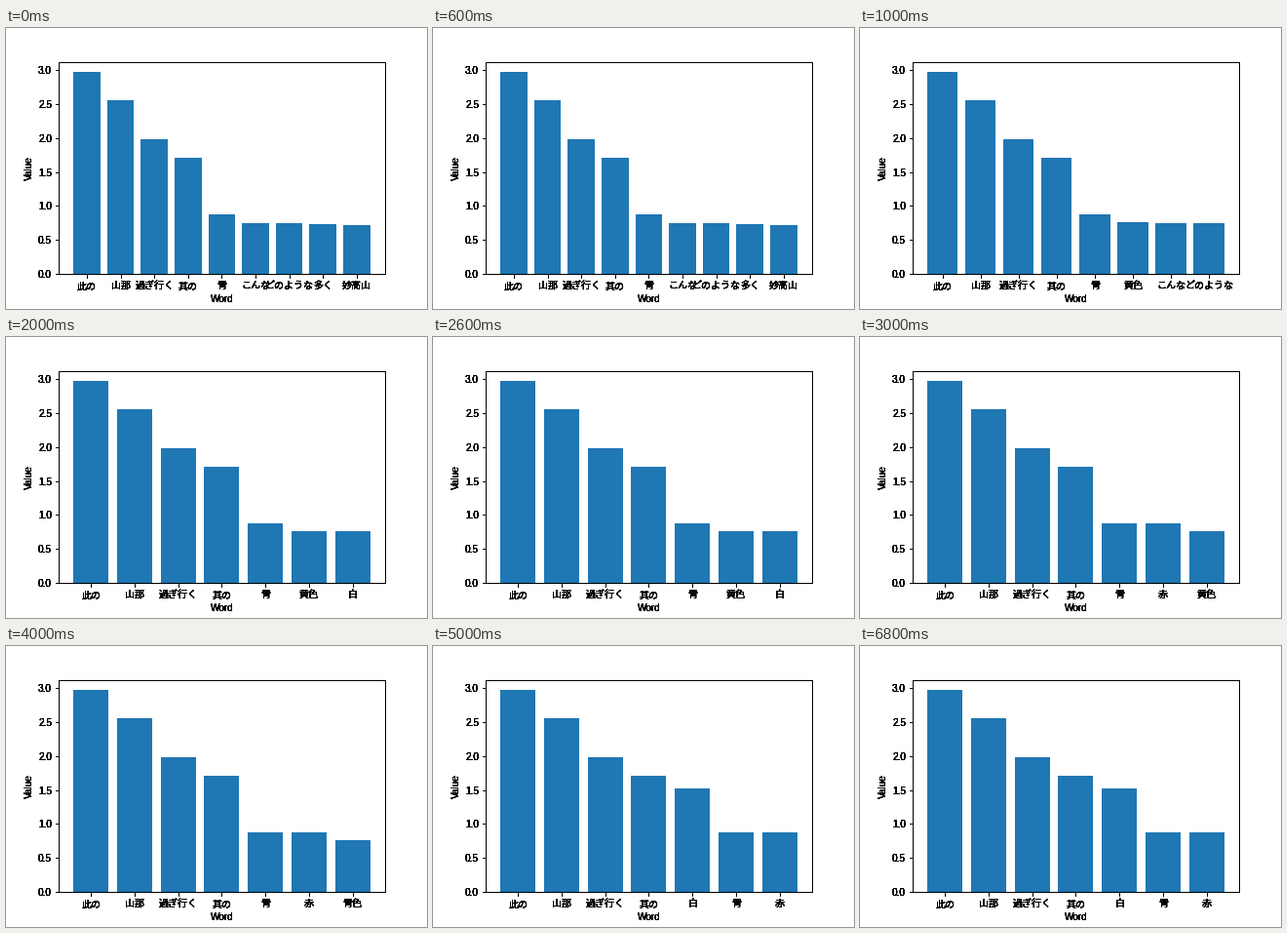
A matplotlib script that plays this animation: 432 by 288 pixels, repeating every 8 s.

```python
import matplotlib.pyplot as plt
from matplotlib.animation import FuncAnimation

plt.rcParams.update({
    "font.family": ["Liberation Sans", "Noto Sans CJK JP"],
    "font.size": 10,
})

VALUES = {
    "此の": 2.975, "山那": 2.56, "過ぎ行く": 1.985, "其の": 1.71,
    "青": 0.88, "赤": 0.88, "黄色": 0.762, "青色": 0.762,
    "こんな": 0.75, "どのような": 0.75, "多く": 0.735, "妙高山": 0.72,
}
COMMON = ["此の", "山那", "過ぎ行く", "其の"]
STEPS = [
    (["青", "こんな", "どのような", "多く", "妙高山"], {}),
    (["青", "黄色", "こんな", "どのような"], {}),
    (["青", "黄色", "白"], {"白": 0.762}),
    (["青", "赤", "黄色"], {}),
    (["青", "赤", "青色"], {}),
    (["白", "青", "赤"], {"白": 1.523}),
]
BAR_WIDTH = 0.8
MARGIN = 0.05
LAYERS = 8  # stacked copies turn soft text edges dark and crisp
RECT = [0.125, 0.125, 0.775, 0.755]

fig = plt.figure(figsize=(6, 4), dpi=72, facecolor="white")
layers = [fig.add_axes(RECT, label=f"layer{i}") for i in range(LAYERS)]


def draw_axes(ax, words, top):
    n = len(words)
    pad = MARGIN * (n - 1 + BAR_WIDTH)
    ax.clear()
    ax.patch.set_visible(False)
    ax.set_xlim(-BAR_WIDTH / 2 - pad, n - 1 + BAR_WIDTH / 2 + pad)
    ax.set_ylim(0, top * (1 + MARGIN))
    ax.set_xticks(range(n), words)
    ax.set_yticks([i * 0.5 for i in range(7)])
    ax.set_xlabel("Word")
    ax.set_ylabel("Value")


def update(second):
    tail, extra = STEPS[min(second, len(STEPS) - 1)]
    words = COMMON + tail
    values = [extra.get(w, VALUES.get(w)) for w in words]
    for ax in layers:
        draw_axes(ax, words, max(values))
    layers[0].bar(range(len(words)), values, BAR_WIDTH, color="#1f77b4")
    return []


anim = FuncAnimation(fig, update, frames=8, init_func=lambda: [],
                     interval=1000, repeat=True, repeat_delay=0)
plt.show()
```
